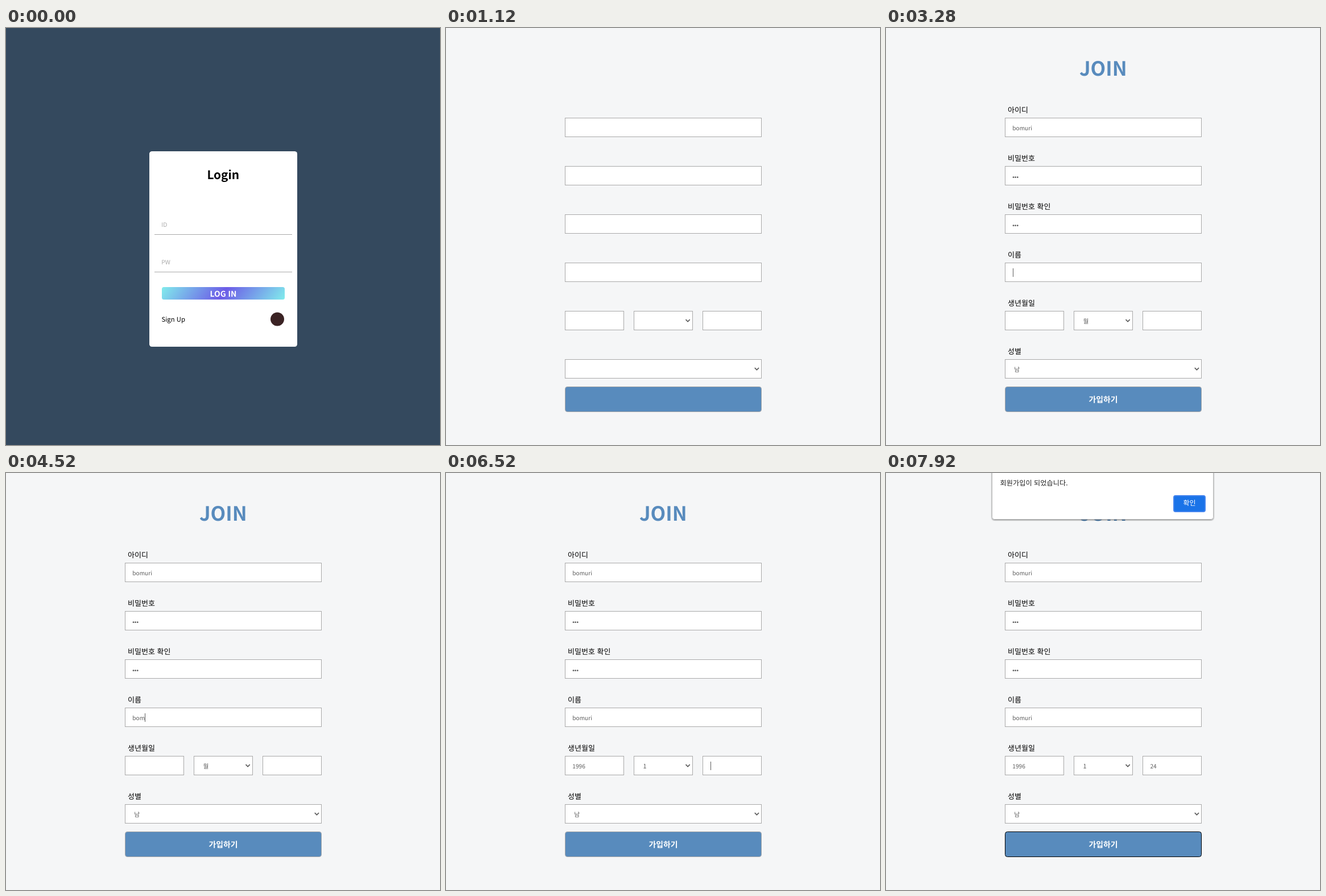
These frames come from a looping animation (763x734 px, 8000 ms). An HTML page:

```html
<!DOCTYPE html>
<html lang="ko">
<head>
<meta charset="utf-8">
<title>Sign up</title>
<style>
  html, body { margin: 0; width: 100%; height: 100%; overflow: hidden; background: #f5f6f7; }
  svg { display: block; }
  text {
    font-family: "Noto Sans CJK KR", "Noto Sans KR", "Noto Sans CJK", "Noto Sans CJK JP", sans-serif;
    text-rendering: geometricPrecision;
  }
  .mid { text-anchor: middle; }
  .bold { font-weight: 700; }
  .hint { font-size: 10.4px; font-weight: 500; fill: #aaa; }
  .label { font-size: 13px; font-weight: 500; }
  .value { font-size: 10.15px; fill: #5c5c5c; }
  .pick { font-size: 10.8px; }
  .dots { font-family: "Liberation Sans", sans-serif; }
  .box { fill: #fff; stroke: #a9a9a9; }
  .arrow { fill: none; stroke: #5c5c5c; stroke-width: 1.7; }
</style>
</head>
<body>
<svg id="stage" width="763" height="734" viewBox="0 0 763 734">
  <defs>
    <linearGradient id="shine" gradientUnits="userSpaceOnUse" x1="304.4" y1="412.6" x2="459.6" y2="521.4">
      <stop offset="0" stop-color="#81ecec"/>
      <stop offset=".5" stop-color="#6c5ce7"/>
      <stop offset="1" stop-color="#81ecec"/>
    </linearGradient>
    <filter id="shadow" x="-5%" y="-10%" width="110%" height="125%">
      <feDropShadow dx="0" dy="1" stdDeviation="1.2" flood-opacity=".5"/>
    </filter>
  </defs>

  <g id="login">
    <rect width="763" height="734" fill="#34495e"/>
    <rect x="252" y="217" width="260" height="344" rx="4.5" fill="#fff"/>
    <text class="mid bold" x="381.8" y="266" font-size="20.8">Login</text>
    <text class="hint" x="273.2" y="350">ID</text>
    <text class="hint" x="273.2" y="416">PW</text>
    <path d="M261 363.5h242M261 429.5h242" stroke="#a9a9a9"/>
    <rect x="274" y="456" width="216" height="22" rx="3.5" fill="url(#shine)"/>
    <text class="mid bold" x="382" y="473" font-size="13.87">LOG IN</text>
    <text x="273.5" y="517" font-size="11.3">Sign Up</text>
    <rect id="underline" x="273" y="518" width="41" height="1"/>
    <circle cx="477" cy="512.5" r="12" fill="#3b2324"/>
  </g>

  <g id="join">
    <rect width="763" height="734" fill="#f5f6f7"/>
    <g id="boxes"></g>
    <path class="arrow" d="M421.5 513.2l3.6 3.6 3.6-3.6M542.8 598.2l3.6 3.6 3.6-3.6"/>
    <rect id="submit" x="209.5" y="631.5" width="345" height="44" rx="4" fill="#588bbd"/>
    <g id="words">
      <text class="mid bold" x="381.8" y="84.3" font-size="34.67" fill="#588bbd">JOIN</text>
      <g id="labels"></g>
      <text class="value pick" x="225.2" y="605">남</text>
      <text class="mid bold" x="382" y="659.3" font-size="13.87" fill="#fff">가입하기</text>
    </g>
    <rect id="caret" width="1" height="15" fill="#5c5c5c"/>
    <g id="dialog">
      <rect x="186.5" y="-20" width="389" height="101.5" rx="4" fill="#fff" stroke="#bbb" filter="url(#shadow)"/>
      <text x="200.6" y="21.6" font-size="12.2" fill="#222">회원가입이 되었습니다.</text>
      <rect x="506" y="40" width="55" height="28" rx="3" fill="#1a73e8" stroke="#4384ee" stroke-width="2"/>
      <text class="mid" x="533.6" y="57.4" font-size="12" fill="#fff">확인</text>
    </g>
  </g>
</svg>
<script>
const LOOP = 8000, ROW = 85;
const $ = id => document.getElementById(id);

function add(parent, tag, attrs, text = '') {
  const el = document.createElementNS('http://www.w3.org/2000/svg', tag);
  for (const key in attrs) el.setAttribute(key, attrs[key]);
  el.textContent = text;
  return $(parent).appendChild(el);
}

document.querySelector('#login .bold[font-size="13.87"]').setAttribute('fill', '#fff');

['아이디', '비밀번호', '비밀번호 확인', '이름', '생년월일', '성별'].forEach((name, row) => {
  add('labels', 'text', { class: 'label', x: 214, y: 149 + ROW * row }, name);
  const xs = row === 4 ? [209.5, 330.5, 451.5] : [209.5];
  const width = row === 4 ? 103 : 345;
  for (const x of xs) add('boxes', 'rect', { class: 'box', x, y: 158.5 + ROW * row, width, height: 33 });
});

// word, left edge, row, extra class, text while empty
const fields = [
  ['bomuri', 222.3, 0], ['•••', 222.3, 1, 'dots'], ['•••', 222.3, 2, 'dots'], ['bomuri', 222.3, 3],
  ['1996', 222.3, 4], ['1', 346.6, 4, 'pick', '월'], ['24', 464.5, 4]
].map(([word, x, row, kind = '', empty = '']) => {
  const y = 180 + ROW * row + (kind === 'dots' ? 1 : 0);
  return { word, x, row, empty, el: add('words', 'text', { class: 'value ' + kind, x, y }) };
});

// time, field, letters typed, caret shown
const type = (start, field, count) =>
  Array.from({ length: count }, (_, i) => [start + 80 * i, field, i + 1, 1]);
const events = [
  [1520, 0, 0, 1], [1840, 0, 0, 0], ...type(2000, 0, 6),
  [2560, 1, 0, 1], ...type(2640, 1, 3),
  [2880, 2, 0, 1], ...type(2960, 2, 3),
  [3280, 3, 0, 1], [3600, 3, 0, 0], [3920, 3, 0, 1], [4240, 3, 0, 0],
  ...type(4360, 3, 6), [5080, 3, 6, 0],
  [5120, 4, 0, 1], [5440, 4, 0, 0], [5760, 4, 0, 1],
  [5840, 4, 1, 1], [5900, 4, 2, 1], [5960, 4, 3, 1], [6160, 4, 4, 1],
  [6280, 5, 0, 0], [6400, 5, 1, 0],
  [6520, 6, 0, 1], [6800, 6, 1, 1], [7080, 6, 2, 1], [7360, 6, 2, 0]
];

const show = (id, on) => $(id).setAttribute('visibility', on ? 'inherit' : 'hidden');

function draw(now) {
  const t = now % LOOP;
  const joined = t >= 1120;
  show('login', !joined);
  show('underline', t >= 440);
  $('join').style.display = joined ? '' : 'none';
  show('words', t >= 1200);

  const typed = fields.map(() => 0);
  let last = null;
  for (const e of events) {
    if (e[0] > t) break;
    typed[e[1]] = e[2];
    last = e;
  }
  fields.forEach((f, i) => {
    const text = f.word.slice(0, typed[i]) || f.empty;
    if (f.el.textContent !== text) f.el.textContent = text;
  });

  const blink = joined && last !== null && last[3] === 1;
  show('caret', blink);
  if (blink) {
    const f = fields[last[1]];
    const width = last[2] ? f.el.getComputedTextLength() : 0;
    $('caret').setAttribute('x', Math.floor(f.x + 0.8 + width));
    $('caret').setAttribute('y', 168 + ROW * f.row);
  }

  $('submit').setAttribute('stroke', t >= 7360 ? '#000' : '#a9a9a9');
  const fade = Math.floor((t - 7840) / 40) + 1;
  $('dialog').setAttribute('opacity', Math.min(1, Math.max(0, fade / 3)));
}

function tick() {
  draw(performance.now());
  requestAnimationFrame(tick);
}
tick();
</script>
</body>
</html>
```
